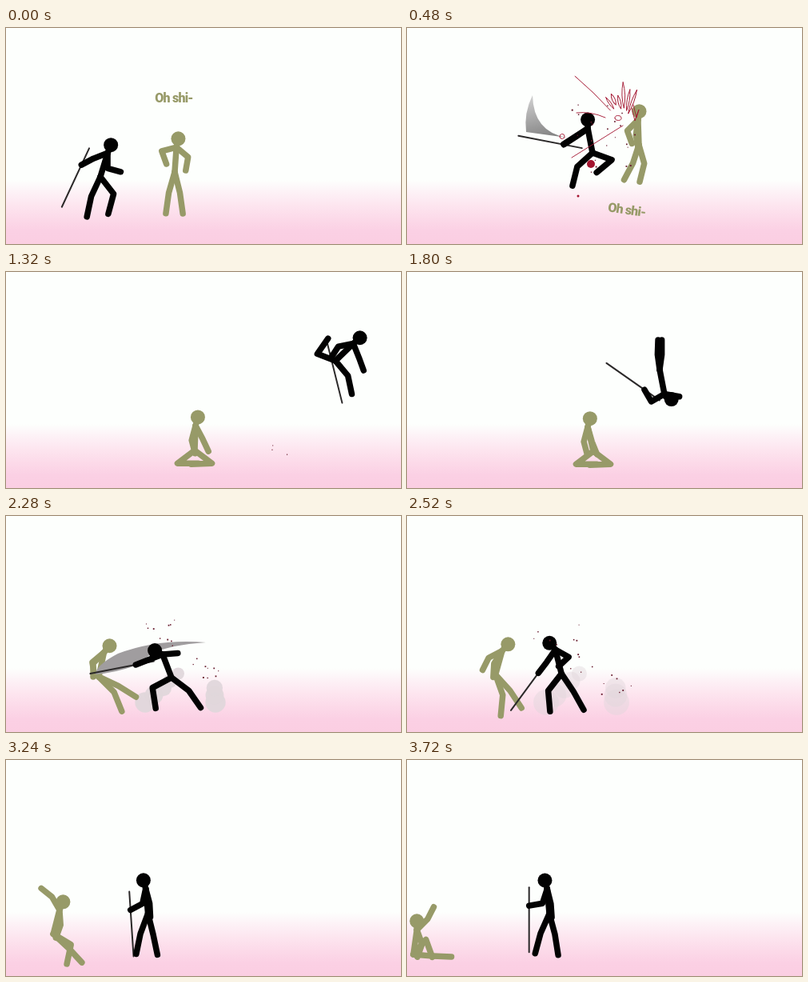
An HTML page with a canvas for the animation above (3780 ms loop, 494 by 270 pixels).

```html
<!DOCTYPE html>
<html lang="en">
<head>
<meta charset="utf-8">
<title>Stick fight</title>
<style>
html, body { margin: 0; width: 494px; height: 270px; overflow: hidden; background: #fdfffd; }
canvas { display: block; }
</style>
</head>
<body>
<canvas id="stage" width="494" height="270"></canvas>
<script>
const ctx = document.getElementById('stage').getContext('2d');
const LOOP = 3780, STEP = 60;
const INK = '#020202', OLIVE = '#979a68', BLOOD = '#a3142f', DROP = '#65182a';
const TORSO = [31, 11], ARM = [19, 17], LEG = [27, 26], STAFF = { tip: 58, end: 23 };

// Angles are in degrees: 0 points down, 90 right, 180 up.
// spine: torso, head. arms: upper, lower. legs: thigh, shin. tuck: foreshortening of the legs.
const fighter = [
  { t: 0, hip: [118, 186], spine: [163, 158], armA: [-69, -62], armB: [0, 75], legA: [-25, -12], legB: [38, -15], staff: [-25] },
  { t: 480, hip: [232, 156], spine: [-169, 180], armA: [-55, -57], armB: [-57, -57], legA: [-48, -14], legB: [70, -50], staff: [-101], tuck: 0.95 },
  { t: 1320, hip: [412, 111], spine: [134, 131], armA: [-79, -33], armB: [22, 20], legA: [-111, 145], legB: [40, 12], staff: [14], tuck: 0.9 },
  { t: 1800, hip: [316, 122], spine: [11, 53], armA: [-60, -150], armB: [80, -90], legA: [-172, 178], legB: [172, 180], staff: [-125], tuck: 0.7 },
  { t: 2280, hip: [207, 202], spine: [-159, -117], armA: [-69, -69], armB: [95, -85], legA: [-62, 9], legB: [53, 35], staff: [-79] },
  { t: 2820, hip: [176, 191], spine: [-174, -165], armA: [8, 2], armB: [18, 0], legA: [-8, 0], legB: [10, 22], staff: [17] },
  { t: 3360, hip: [178, 192], spine: [-175, -165], armA: [-18, -80], armB: [14, 4], legA: [-24, -15], legB: [15, 9], staff: [0] }
];

const kneel = { hip: [236, 223], spine: [178, 165], armA: [28, 25], armB: [-15, 15], legA: [53, -88], legB: [-53, 90] };
const slump = { ...kneel, hip: [233, 224], spine: [-167, 165], armA: [16, 22] };
const victim = [
  { t: 0, hip: [211, 180], spine: [176, 168], armA: [-75, 20], armB: [50, -10], legA: [-16, -8], legB: [14, 8] },
  { t: 480, hip: [290, 146], spine: [-178, 172], armA: [-45, 20], armB: [-8, 10], legA: [-18, -28], legB: [16, -14], tuck: 0.9 },
  { ...kneel, t: 960 },
  { ...kneel, t: 1320 },
  { ...slump, t: 1800 },
  { ...slump, t: 2100 },
  { t: 2280, hip: [116, 201], spine: [168, 140], armA: [-45, 0], armB: [-50, 10], legA: [45, 22], legB: [65, 58] },
  { t: 2820, hip: [104, 195], spine: [160, 135], armA: [-84, -60], armB: [-10, -20], legA: [-12, -40], legB: [14, 3] },
  { t: 3720, hip: [8, 243], spine: [172, 180], armA: [135, 153], armB: [20, -20], legA: [140, 20], legB: [85, 88], tuck: 0.9 }
];

const mix = (a, b, k) => a + (b - a) * k;
const turn = (a, b, k) => a + ((b - a + 900) % 360 - 180) * k;
const within = (t, from, to) => t >= from && t <= to;

function poseAt(keys, t) {
  const i = Math.max(1, keys.findIndex(key => key.t > t));
  const last = keys[keys.length - 1];
  if (t >= last.t) return last;
  const a = keys[i - 1], b = keys[i], k = (t - a.t) / (b.t - a.t);
  const pose = { tuck: mix(a.tuck || 1, b.tuck || 1, k) };
  for (const part in a) {
    if (!Array.isArray(a[part])) continue;
    const blend = part === 'hip' ? mix : turn;
    pose[part] = a[part].map((v, n) => blend(v, b[part][n], k));
  }
  return pose;
}

function line(pts, color, width) {
  ctx.strokeStyle = color;
  ctx.lineWidth = width;
  ctx.beginPath();
  pts.forEach(p => ctx.lineTo(...p));
  ctx.stroke();
}

function disc(x, y, r, color) {
  ctx.fillStyle = color;
  ctx.beginPath();
  ctx.arc(x, y, r, 0, 7);
  ctx.fill();
}

function step([x, y], angle, len) {
  const a = angle * Math.PI / 180;
  return [x + len * Math.sin(a), y + len * Math.cos(a)];
}

// Follows two bones from a joint and returns all three points.
function chain(from, angles, sizes, scale = 1) {
  const middle = step(from, angles[0], sizes[0] * scale);
  return [from, middle, step(middle, angles[1], sizes[1] * scale)];
}

function figure(pose, color) {
  const spine = chain(pose.hip, pose.spine, TORSO);
  const armA = chain(spine[1], pose.armA, ARM);
  if (pose.staff) {
    const [angle] = pose.staff, hand = armA[2];
    line([step(hand, angle, STAFF.tip), step(hand, angle, -STAFF.end)], '#2b2929', 2);
  }
  const limbs = [
    spine, armA,
    chain(spine[1], pose.armB, ARM),
    chain(pose.hip, pose.legA, LEG, pose.tuck),
    chain(pose.hip, pose.legB, LEG, pose.tuck)
  ];
  limbs.forEach(limb => line(limb, color, 7.5));
  disc(...spine[2], 9, color);
}

const rand = n => { const s = Math.sin(n * 127.1) * 43758.5453; return s - Math.floor(s); };

// Droplets thrown from a point and pulled down.
function drops(t, start, life, x, y, count, spread) {
  if (!within(t, start, start + life)) return;
  const s = (t - start) / 1000;
  ctx.fillStyle = DROP;
  for (let i = 0; i < count; i++) {
    const r = k => rand(x + i * 5 + k);
    const px = x + (r(0) - 0.5) * spread + (r(1) - 0.5) * 150 * s;
    const py = y + (r(2) - 0.5) * spread - 110 * r(3) * s + 260 * s * s;
    if (py < 242) ctx.fillRect(px, py, 1 + r(4), 1 + r(4));
  }
}

function splash(t) {
  if (!within(t, 420, 540)) return;
  const grow = 0.6 + (t - 420) / 150;
  ctx.save();
  ctx.translate(272, 120);
  ctx.scale(Math.min(grow, 1.1), Math.min(grow, 1.1));
  ctx.strokeStyle = BLOOD;
  ctx.lineWidth = 0.9;
  for (let i = 0; i < 7; i++) {
    ctx.save();
    ctx.rotate((-136 + i * 11) * Math.PI / 180);
    const near = 10 + 18 * rand(i + 2), far = i ? 36 + 22 * rand(i + 7) : 86, w = 2 + 2 * rand(i);
    ctx.beginPath();
    ctx.moveTo(far, 0);
    ctx.quadraticCurveTo((near + far) / 2, w, near, 0);
    if (i) ctx.quadraticCurveTo((near + far) / 2, -w, far, 0);
    ctx.stroke();
    ctx.restore();
  }
  ctx.stroke(new Path2D('M-60-14Q-42-16-24-8M-66 42L-2 2M-12-7a4 3 0 1 0 8-1a4 3 0 1 0-8 1M11-24L15-8L18-18L13-4L9-20'));
  ctx.stroke(new Path2D('M-81 16a3 3 0 1 0 6-1a3 3 0 1 0-6 1'));
  ctx.restore();
  disc(230, 170, 5, BLOOD);
  disc(214, 210, 1.5, BLOOD);
}

function slashes(t) {
  if (within(t, 420, 540)) {
    const shade = ctx.createLinearGradient(158, 84, 170, 137);
    shade.addColorStop(0, '#d0d0d0');
    shade.addColorStop(1, '#858585');
    ctx.fillStyle = shade;
    ctx.fill(new Path2D('M157 84Q146 106 149 130L200 137Q158 130 157 84Z'));
  }
  if (within(t, 2220, 2340)) {
    ctx.fillStyle = '#a09d9f';
    ctx.fill(new Path2D('M112 198Q113 186 140 172Q190 153 250 158Q205 161 182 172L162 187Q136 196 112 198Z'));
  }
}

function caption(t) {
  const k = Math.max(0, (t - 120) / 360);
  if (k > 1.5) return;
  ctx.save();
  ctx.translate(210 + 65 * k, 87 + 140 * k * k);
  ctx.rotate(0.14 * k);
  ctx.font = '900 16px Roboto, sans-serif';
  ctx.letterSpacing = '-0.8px';
  ctx.textAlign = 'center';
  ctx.textBaseline = 'middle';
  ctx.fillStyle = OLIVE;
  ctx.fillText('Oh shi-', 0, 1);
  ctx.restore();
}

function dust(t) {
  const k = (t - 2160) / 480;
  if (!within(k, 0, 1)) return;
  ctx.globalAlpha = 1 - k * k;
  for (const [x, lean, rows] of [[174, 9, 5], [262, -3, 3]]) {
    for (let i = 0; i < rows; i++)
      disc(x + lean * i + 6 * rand(i), 233 - 9 * i, (13 - 1.3 * i) * (0.85 + 0.5 * k), '#e0d6db');
  }
  ctx.globalAlpha = 1;
}

const backdrop = ctx.createLinearGradient(0, 190, 0, 270);
['#fdfffd', '#fdf1f6', '#fde5ef', '#fcdae9', '#fbd0e4', '#fbcee2']
  .forEach((color, i, all) => backdrop.addColorStop(i / (all.length - 1), color));

function draw(t) {
  ctx.fillStyle = backdrop;
  ctx.fillRect(0, 0, 494, 270);
  ctx.lineCap = ctx.lineJoin = 'round';

  dust(t);
  caption(t);
  figure(poseAt(victim, t), OLIVE);
  slashes(t);
  figure(poseAt(fighter, t), INK);
  splash(t);

  drops(t, 420, 600, 245, 140, 22, 90);
  drops(t, 1140, 360, 342, 224, 3, 16);
  drops(t, 2160, 540, 198, 150, 10, 30);
  drops(t, 2160, 540, 250, 192, 9, 26);
}

const begin = performance.now();
function tick() {
  const t = (performance.now() - begin) % LOOP;
  draw(Math.floor(t / STEP) * STEP);
  requestAnimationFrame(tick);
}
tick();
</script>
</body>
</html>
```
